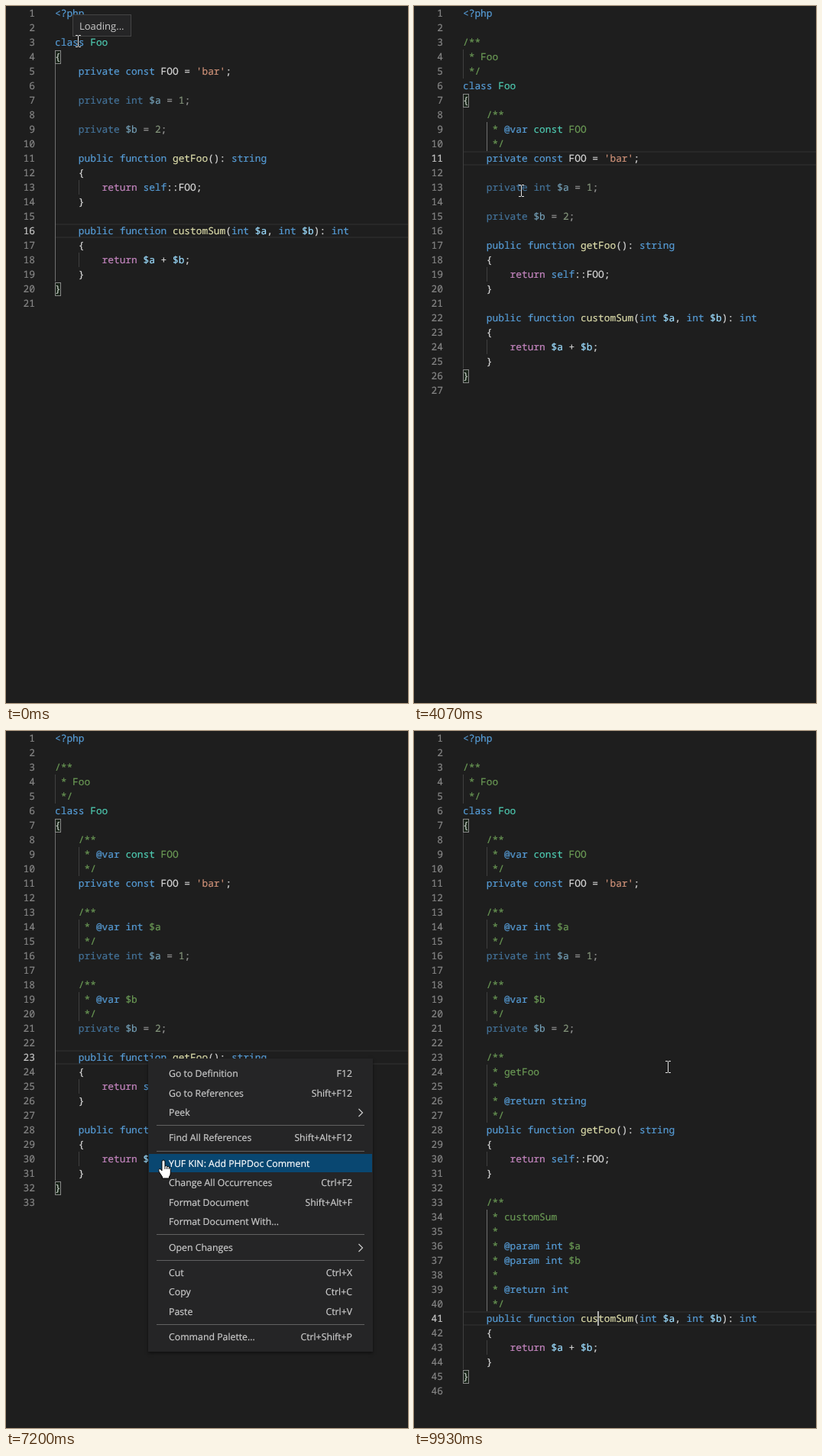
Write an HTML page that moves like this. It is 526 by 913 pixels and loops after 10000 ms.

```html
<!DOCTYPE html>
<html lang="en">
<head>
<meta charset="utf-8">
<title>Adding doc comments</title>
<style>
html, body { margin: 0; width: 100%; height: 100%; overflow: hidden; background: #1e1e1e; }
#stage { position: relative; width: 526px; height: 913px; overflow: hidden; background: #1e1e1e;
  text-rendering: geometricPrecision; isolation: isolate; }
#stage div, #stage svg { position: absolute; }
#code { inset: 0; font: 12.833px/19px "Noto Sans Mono", monospace; color: #d4d4d4; white-space: pre;
  -webkit-text-stroke: .2px; }
.num { left: 0; width: 38px; text-align: right; color: #858585; }
.num.on { color: #c6c6c6; }
.line { left: 64px; height: 19px; }
.dim { opacity: .667; }
.doc { color: #6a9955; }
.current { left: 64px; right: -4px; height: 19px; box-sizing: border-box; border: 2px solid #282828; border-left: 0; }
.guide { width: 1px; height: 19px; background: #404040; }
.guide.on { background: #707070; }
.bracket { left: 64px; width: 8px; height: 18px; box-sizing: border-box; border: 1px solid #888; background: rgba(0,100,0,.1); }
.k { color: #569cd6; } .v { color: #9cdcfe; } .s { color: #ce9178; } .r { color: #c586c0; }
.c { color: #4ec9b0; } .f { color: #dcdcaa; } .n { color: #b5cea8; }
#caret { width: 2px; height: 19px; background: #aeafad; }
#tip { left: 87px; top: 11px; width: 77px; height: 29px; box-sizing: border-box; border: 1px solid #454545;
  background: #252526; color: #ccc; font: 13px/28px "Open Sans", sans-serif; padding-left: 8px; }
#menu { width: 294px; height: 384px; background: #252526; color: #ccc; white-space: pre;
  box-shadow: 0 2px 4px rgba(0,0,0,.5); font: 12.3px/24px "Open Sans", sans-serif; -webkit-text-stroke: .2px; }
.item { left: 1px; width: 292px; height: 24px; }
.item.on { background: #094771; color: #fff; }
.item span { position: absolute; left: 26px; top: 1px; }
.item .key { left: auto; right: 26px; }
.item svg { left: 273px; top: 7px; }
.sep { left: 11px; width: 272px; height: 1px; background: #616161; }
#beam { mix-blend-mode: difference; }
#mouse, #beam { left: 0; top: 0; overflow: visible; }
</style>
</head>
<body>
<div id="stage">
  <div id="code"></div>
  <div id="caret"></div>
  <div id="tip">Loading...</div>
  <div id="menu"></div>
  <svg id="mouse" width="1" height="1">
    <g id="hand" stroke="#000" stroke-linejoin="round">
      <path fill="#fff" d="M-2 2Q-2 0 0 0T2 2V8Q4 6.7 4.7 8.5Q6.6 7.5 7.3 9.5Q9.3 9 9.3 11.5V17Q9.3 20 7.5 22V24H-1.5V22L-6 15Q-7 12-5 11.5Q-3.5 11.5-2 14Z"/>
      <path fill="none" d="M2 8V12M4.7 8.7V12M7.3 9.7V12"/>
    </g>
    <path id="arrow" fill="#fff" stroke="#000" d="M.5 .5V16.5L4.2 13L6.8 18.8L9.3 17.7L6.8 12H11.8Z"/>
  </svg>
  <svg id="beam" width="1" height="1">
    <path fill="none" stroke="#fff" d="M-3 -7.5H0M1 -7.5H4M.5 -7V7M-3 7.5H0M1 7.5H4"/>
  </svg>
</div>
<script>
const LOOP = 10000, FPS = 15, LINE = 19, CHAR = 7.7, LEFT = 64;
const STAGE_H = 913, MENU_W = 294, MENU_H = 384, ITEM_H = 24, REACH = 133, TIP_END = 1130;
const $ = id => document.getElementById(id);

// Each block: doc body lines, then its code lines.
const blocks = [
  { pad: '', doc: ['Foo'], code: ['class Foo', '{'] },
  { doc: ['@var const FOO'], code: ["private const FOO = 'bar';", ''] },
  { doc: ['@var int $a'], code: ['private int $a = 1;', ''] },
  { doc: ['@var $b'], code: ['private $b = 2;', ''] },
  { doc: ['getFoo', '', '@return string'],
    code: ['public function getFoo(): string', '{', '    return self::FOO;', '}', ''] },
  { doc: ['customSum', '', '@param int $a', '@param int $b', '', '@return int'],
    code: ['public function customSum(int $a, int $b): int', '{', '    return $a + $b;', '}'] }
];

// One right click per block: menu opens, closes, pressed at x, y, then moved sideways by dx.
const rounds = [
  [1330, 1870, 91, 46, 34],
  [2670, 3270, 120, 142, 26],
  [4270, 4730, 140, 242, 29],
  [5670, 6200, 161, 338, 17],
  [6800, 7470, 186, 429, 20],
  [8070, 9470, 240, 619, 101]
].map(([open, close, x, y, dx]) => {
  const flip = y + MENU_H > STAGE_H;
  return { open, close, x, y, dx, flip, top: flip ? y - MENU_H : y,
    insert: close + 60, caretOff: close + 490, col: Math.round((x - LEFT) / CHAR) };
});

// Pointer path: rest at the press point, reach for the item, then head for the next press.
const path = [];
const stay = (from, to, x, y) => path.push([from, x, y], [to, x, y]);
let arrive = rounds[0].open - 60;
stay(0, TIP_END, 94, 46);
for (const { open, close, x, y, dx, flip, top } of rounds) {
  stay(arrive, open + 70, x, y);
  stay(open + 400, flip ? open + 530 : close, x + dx, y + REACH);
  if (flip) stay(open + 1130, close, x + dx, top + REACH);
  arrive = close + 400;
}
stay(arrive, LOOP, 332, 440);

function pointer(t) {
  const i = path.findIndex(p => p[0] > t);
  const [a, x, y] = path[i - 1], [b, x2, y2] = path[i];
  const u = (t - a) / (b - a), e = u * u * (3 - 2 * u);
  return [x + (x2 - x) * e, y + (y2 - y) * e].map(Math.round);
}

// Blank entries are separators; '>' marks a submenu.
const entries = `Go to Definition|F12
Go to References|Shift+F12
Peek|>

Find All References|Shift+Alt+F12

YUF KIN: Add PHPDoc Comment|
Change All Occurrences|Ctrl+F2
Format Document|Shift+Alt+F
Format Document With...|

Open Changes|>

Cut|Ctrl+X
Copy|Ctrl+C
Paste|Ctrl+V

Command Palette...|Ctrl+Shift+P`.split('\n');
const chevron = '<svg width="8" height="12"><path d="M1.5 1L6.5 6L1.5 11" fill="none" stroke="#ccc" stroke-width="1.2"/></svg>';

const items = [];
function buildMenu() {
  let y = 7.3, html = '';
  for (const entry of entries) {
    if (!entry) {
      html += `<div class="sep" style="top:${Math.round(y + 4)}px"></div>`;
      y += 8.2;
      continue;
    }
    const [name, key] = entry.split('|'), top = Math.round(y);
    const side = key === '>' ? chevron : `<span class="key">${key}</span>`;
    html += `<div class="item" style="top:${top}px"><span>${name}</span>${side}</div>`;
    items.push({ top });
    y += 25.33;
  }
  $('menu').innerHTML = html;
  document.querySelectorAll('.item').forEach((el, i) => items[i].el = el);
}

const escape = s => s.replace(/</g, '&lt;');
const paint = (s, rules) => {
  const any = new RegExp(rules.map(r => `(${r[1]})`).join('|'), 'g');
  return s.replace(any, (m, ...g) =>
    `<span class="${rules[g.findIndex((x, i) => i < rules.length && x)][0]}">${m}</span>`);
};
const codeRules = [
  ['k', '&lt;\\?php|\\b(?:private|public|const|function|class|int|string|self)\\b'],
  ['v', '\\$\\w+'], ['s', "'.*?'"], ['r', 'return'], ['c', '\\bFoo\\b'],
  ['f', 'getFoo|customSum'], ['n', '\\b\\d\\b']
];
const docRules = [['k', '@\\w+|\\b(?:int|string)\\b'], ['c', '\\bconst\\b']];

function makeLines(docs) {
  const lines = [{ s: '<?php' }, { s: '' }], heads = [];
  blocks.forEach(({ pad = '    ', doc, code }, i) => {
    if (i < docs) {
      lines.push({ s: pad + '/**', doc: i });
      for (const d of doc) lines.push({ s: `${pad} * ${d}`, doc: i });
      lines.push({ s: pad + ' */', doc: i });
    }
    heads.push(lines.length);
    for (const c of code) lines.push({ s: c && pad + c, inside: pad !== '' });
  });
  lines.push({ s: '}' }, { s: '' });
  return { lines, heads };
}

function drawCode(docs, target) {
  const { lines, heads } = makeLines(docs), cur = heads[target], open = heads[0] + 1;
  const box = (cls, y, more = '', body = '') =>
    `<div class="${cls}" style="top:${y}px;${more}">${body}</div>`;
  let html = box('current', cur * LINE);
  lines.forEach(({ s, doc, inside }, i) => {
    const y = i * LINE, indent = s.search(/\S/), isDoc = doc !== undefined;
    const guide = (x, on) => html += box('guide' + (on ? ' on' : ''), y, `left:${x}px`);
    const mine = isDoc && doc === target;
    if (inside || indent > 0) guide(LEFT, target ? target >= docs && i > open : mine);
    if (indent > 4) guide(LEFT + 31, mine);
    const dim = /private (?!const)/.test(s) ? ' dim' : '';
    html += box('num' + (i === cur ? ' on' : ''), y, '', i + 1);
    html += box('line' + (isDoc ? ' doc' : dim), y, '', paint(escape(s), isDoc ? docRules : codeRules));
    if (target && (i === open || i === lines.length - 2)) html += box('bracket', y + 1);
  });
  $('code').innerHTML = html;
  $('caret').style.top = cur * LINE + 'px';
}

const show = (id, on) => $(id).style.display = on ? '' : 'none';
const place = (id, x, y) => $(id).style.transform = `translate(${x}px,${y}px)`;

let last = '';
function draw(t) {
  const docs = rounds.filter(r => t >= r.insert).length;
  const opened = rounds.filter(r => t >= r.open).length;
  const target = (opened || blocks.length) - 1;
  const key = docs + ':' + target;
  if (key !== last) drawCode(docs, target);
  last = key;

  const r = rounds[target], isOpen = t >= r.open && t < r.close;
  show('tip', t < TIP_END);
  show('caret', t >= r.insert && t < r.caretOff);
  $('caret').style.left = Math.round(LEFT + r.col * CHAR) - 1 + 'px';

  const [x, y] = pointer(t);
  let kind = 'beam';
  show('menu', isOpen);
  if (isOpen) {
    place('menu', r.x, r.top);
    $('menu').style.opacity = t < r.open + 60 ? .5 : 1;
    const dx = x - r.x, dy = y - r.top;
    let hover = false;
    for (const { el, top } of items) {
      const on = dx > 0 && dx < MENU_W && dy >= top && dy < top + ITEM_H;
      el.classList.toggle('on', on);
      hover = hover || on;
    }
    if (target) kind = hover ? 'hand' : 'arrow';
  }
  for (const id of ['beam', 'hand', 'arrow']) show(id, kind === id);
  place('beam', x, y);
  place('mouse', x, y);
}

const start = performance.now();
function tick() {
  const t = (performance.now() - start) % LOOP;
  const step = Math.floor((t + 4) * FPS / 1000) % (LOOP * FPS / 1000);
  draw(Math.round(step * 100 / FPS) * 10);
  requestAnimationFrame(tick);
}
buildMenu();
tick();
</script>
</body>
</html>
```
